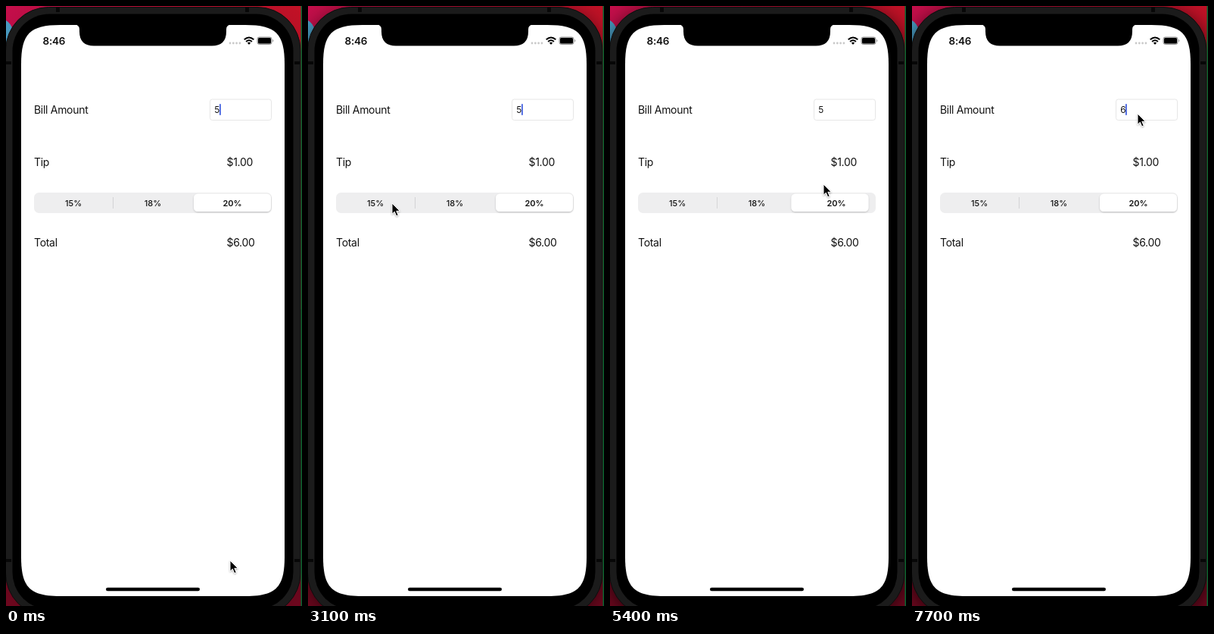
Write an HTML page that moves like this. It is 391 px wide and 791 px high and loops after 8000 ms.

```html
<!DOCTYPE html>
<html lang="en">
<head>
<meta charset="utf-8">
<title>Tip calculator</title>
<style>
  html, body { margin: 0; width: 100%; height: 100%; overflow: hidden; background: #000; }
  svg { display: block; width: 391px; height: 791px; font-family: Inter, Roboto, sans-serif; }
  .label { font-size: 14px; letter-spacing: -.3px; fill: #111; }
  .seg { font-size: 11px; font-weight: 500; text-anchor: middle; fill: #111; }
  .menu { font-size: 11.8px; text-anchor: middle; fill: #f4f4f4; }
</style>
</head>
<body>
<svg viewBox="0 0 391 791">
  <defs>
    <linearGradient id="wall">
      <stop offset="0" stop-color="#c40f4b"/><stop offset="1" stop-color="#c11226"/>
    </linearGradient>
    <filter id="blur" x="-20%" y="-20%" width="140%" height="140%">
      <feGaussianBlur stdDeviation="14"/>
    </filter>
    <filter id="soft" x="-20%" y="-40%" width="140%" height="200%">
      <feDropShadow dx="0" dy="1" stdDeviation="1" flood-opacity=".2"/>
    </filter>
    <filter id="lift" x="-50%" y="-50%" width="200%" height="200%">
      <feDropShadow dx="0" dy="1" stdDeviation=".8" flood-opacity=".35"/>
    </filter>
  </defs>

  <!-- desktop -->
  <rect width="391" height="400" fill="url(#wall)"/>
  <rect y="400" width="391" height="391" fill="#70081f"/>
  <path d="M0 19Q7 23 9 32L0 52Z" fill="#4a9dc4"/>
  <rect id="shade" y="8" width="389" height="800" rx="57" filter="url(#blur)"/>

  <!-- phone -->
  <rect x="-.5" y="1.500" width="389.500" height="803" rx="57" fill="#1b1b1b" stroke="#0d0d0d"/>
  <rect x="8.500" y="10.500" width="371" height="785" rx="49"/>
  <g id="bumps" fill="#070707"></g>
  <rect x="389.500" width="1.500" height="791" fill="#07642f"/>
  <path id="screen" fill="#fff"/>
  <path d="M91 24.500Q97 25 97 31V33.500Q97 52.500 116 52.500H272Q291 52.500 291 33.500V31Q291 25 297 24.500Z"/>
  <rect x="132" y="766.800" width="124" height="4.400" rx="2.200"/>

  <!-- status bar -->
  <text x="48.500" y="50.500" font-size="13.500" font-weight="600" letter-spacing="-.2" fill="#111">8:46</text>
  <path d="M296 49H309" stroke="#c9c9c9" stroke-width="2.800" stroke-linecap="round" stroke-dasharray="0 4.300"/>
  <path d="M314.700 44.300Q321 38.700 327.300 44.300M317.100 47Q321 43.500 324.900 47" fill="none" stroke="#000" stroke-width="2"/>
  <path d="M318.800 48.600Q321 46.800 323.200 48.600L321 50.900Z"/>
  <rect x="332" y="41" width="19" height="9.500" rx="2.600" fill="#ccc" stroke="#888" stroke-width=".9"/>
  <rect x="333" y="42" width="17" height="7.500" rx="1.500"/>
  <path d="M352.300 44v3.500q1.200-.5 1.200-1.750t-1.200-1.750" fill="#999"/>

  <!-- form -->
  <g class="label">
    <text x="37" y="142">Bill Amount</text>
    <text x="37" y="211">Tip</text>
    <text x="37" y="317">Total</text>
    <text id="tip" x="291.500" y="211"></text>
    <text id="total" x="291.500" y="317"></text>
  </g>
  <rect x="269.500" y="123" width="81" height="27.500" rx="3" fill="#fff" stroke="#e6e6e6"/>
  <text id="bill" x="275.200" y="141.200" font-size="11.800" fill="#111"></text>
  <rect id="caret" y="129" width="1.800" height="15" rx=".8" fill="#4361e0"/>

  <rect x="37" y="246" width="314" height="27" rx="6.500" fill="#eeeeef"/>
  <rect id="div0" x="141" y="252" width="1" height="15" fill="#d3d3d5"/>
  <rect id="div1" x="246" y="252" width="1" height="15" fill="#d3d3d5"/>
  <rect id="pill" y="247.500" width="102" height="23.500" rx="5.500" fill="#fff" filter="url(#soft)"/>
  <g class="seg" id="segs"></g>

  <!-- edit menu -->
  <g id="menu">
    <rect x="211" y="83" width="143" height="31" rx="6"/>
    <path d="M274 113L282.500 122L291 113Z"/>
    <rect x="273" y="83" width="1" height="31" fill="#444"/>
    <text class="menu" x="242.500" y="102.800">Select</text>
    <text class="menu" x="313.500" y="102.800">Select All</text>
  </g>

  <path id="mouse" d="M0 0V14.300L3.300 11.200L5.700 16.800L8.200 15.700L5.800 10.300H10.300Z"
        stroke="#fff" stroke-linejoin="round" filter="url(#lift)"/>
</svg>
<script>
const LOOP = 8000, TICK = 100, SLIDE = 400, STEP = 105;
const el = id => document.getElementById(id);
const [tip, total, bill, caret, pill, menu, mouse, shade] =
  ['tip', 'total', 'bill', 'caret', 'pill', 'menu', 'mouse', 'shade'].map(el);
const dividers = [el('div0'), el('div1')];
const rates = [15, 18, 20];

el('segs').innerHTML = rates.map((r, i) =>
  `<text x="${89 + STEP * i}" y="263.5">${r}%</text>`).join('');
const labels = [...el('segs').children];

const bump = (x, y, w, h) => `<rect x="${x}" y="${y}" width="${w}" height="${h}"/>`;
el('bumps').innerHTML = [66, 316].map(x => bump(x, 2, 5, 6)).join('') +
  [73, 729].map(y => bump(0, y, 7, 4) + bump(381, y, 7, 4)).join('');

// Rectangle with continuous corners: each curve reaches past the radius
function squircle(l, t, r, b, radius) {
  const e = radius * 1.4, c = radius * .31;
  return `M${l} ${t + e}C${l} ${t + c} ${l + c} ${t} ${l + e} ${t}` +
    `H${r - e}C${r - c} ${t} ${r} ${t + c} ${r} ${t + e}` +
    `V${b - e}C${r} ${b - c} ${r - c} ${b} ${r - e} ${b}` +
    `H${l + e}C${l + c} ${b} ${l} ${b - c} ${l} ${b - e}Z`;
}
el('screen').setAttribute('d', squircle(20, 25, 368, 778, 37));

// Pointer stops: time, x, y
const stops = [
  [600, 296, 731], [1100, 306, 101], [1300, 315, 231], [1800, 219, 277],
  [2100, 278, 154], [2700, 111, 260], [3700, 111, 260], [3900, 169, 268],
  [4600, 192, 266], [5200, 290, 263], [5400, 282, 235], [5700, 298, 142]
];

// Chosen segment: start time, index
const picks = [[-SLIDE, 2], [3310, 0], [4240, 1], [5070, 2]];

const ramp = (t, a, b) => Math.max(0, Math.min(1, (t - a) / (b - a)));
const ease = k => k * k * (3 - 2 * k);
const mix = (a, b, k) => a + (b - a) * k;
const money = v => '$' + v.toFixed(2);

function pointer(t) {
  const next = stops.findIndex(s => s[0] > t);
  const i = next < 0 ? stops.length - 1 : Math.max(1, next);
  const [a, b] = [stops[i - 1], stops[i]], k = ramp(t, a[0], b[0]);
  return [mix(a[1], b[1], k), mix(a[2], b[2], k)];
}

function blink(t) {
  const p = t % 1000;
  return t >= 7500 ? 1 : 1 - ramp(p, 200, 300) + ramp(p, 500, 600);
}

function draw(time) {
  const t = Math.floor(time / TICK) * TICK;

  const n = picks.findLastIndex(p => p[0] <= t);
  const [start, now] = picks[n], before = picks[Math.max(0, n - 1)][1];
  const k = ease(ramp(t, start, start + SLIDE));
  pill.setAttribute('x', 38 + STEP * mix(before, now, k));
  labels.forEach((l, i) => l.style.fontWeight = i === now ? 600 : 500);
  dividers.forEach((d, i) => {
    const shown = s => s === i || s === i + 1 ? 0 : 1;
    d.style.opacity = mix(shown(before), shown(now), k);
  });

  const tipValue = 5 * rates[now] / 100;
  tip.textContent = money(tipValue);
  total.textContent = money(5 + tipValue);

  const amount = t < 6800 ? '5' : t < 7500 ? '' : '6';
  bill.textContent = amount;
  caret.setAttribute('x', amount ? 282 : 275.5);
  caret.style.opacity = blink(t);

  // The window shadow deepens once it gains focus
  shade.style.opacity = mix(.1, .75, ramp(t, 2800, 3200));
  menu.style.opacity = ramp(t, 6400, 6600) * (1 - ramp(t, 6750, 7100));
  mouse.setAttribute('transform', `translate(${pointer(t)})`);
}

const begin = performance.now();
function loop() {
  draw((performance.now() - begin) % LOOP);
  requestAnimationFrame(loop);
}
loop();
</script>
</body>
</html>
```
